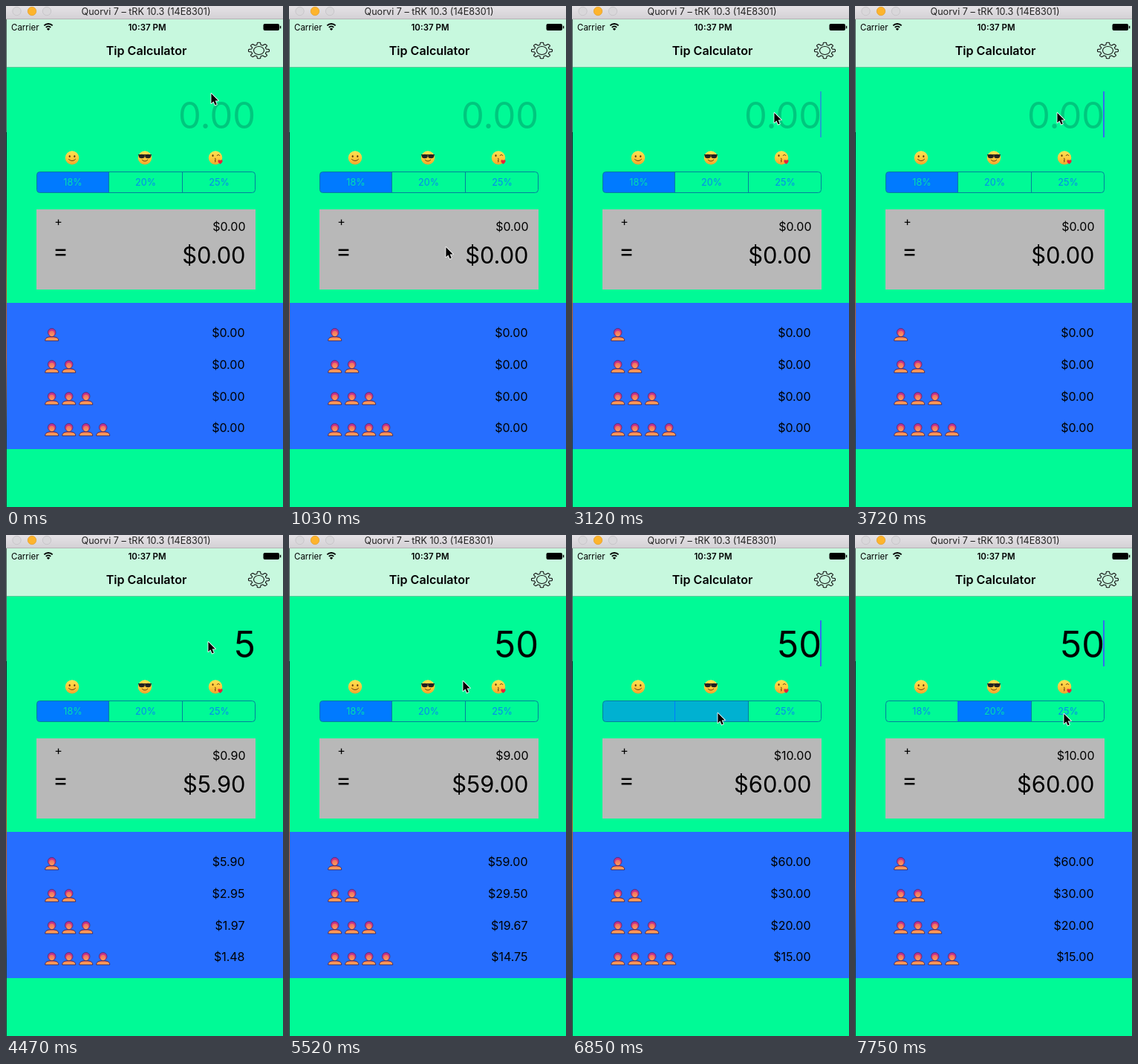
An HTML page with a canvas that plays this animation: 373 px wide and 675 px high, repeating every 8000 ms.

```html
<!DOCTYPE html>
<html lang="en">
<head>
<meta charset="utf-8">
<title>Tip Calculator</title>
<style>
html, body { margin: 0; width: 100%; height: 100%; overflow: hidden; background: #00fa96; }
canvas { display: block; width: 373px; height: 675px; }
</style>
</head>
<body>
<canvas id="stage"></canvas>
<script>
const W = 373, H = 675, LOOP = 8000, STEP = 148.9;
const GREEN = '#00fa96', BLUE = '#007aff', LINE = '#04809c', FONT = 'Inter, "Liberation Sans", sans-serif';
const canvas = document.getElementById('stage');
const ctx = canvas.getContext('2d');
const dpr = window.devicePixelRatio || 1;
canvas.width = W * dpr;
canvas.height = H * dpr;

// Keys are [tick, value...]; the screen updates once per tick.
const pointerKeys = [
  [0, 276, 117], [7, 211, 324], [8, 188, 291], [10, 181, 250], [15, 272, 143], [35, 272, 143],
  [39, 196, 249], [40, 196, 249], [43, 196, 239], [47, 196, 239], [52, 281, 240]
];
const caretKeys = [
  [0, 0], [17, 1], [21, .6], [22, 0], [24, .6], [25, 1], [29, .6], [30, 0], [31, 1], [35, .6], [36, 0],
  [38, .6], [39, 1], [41, .6], [42, 0], [45, .6], [46, 1], [48, .6], [49, 0], [51, .6], [52, 1]
];
const billKeys = [[0, ''], [26, '5'], [31, '50']];

function held(keys, tick) {
  return keys.filter(k => k[0] <= tick).pop()[1];
}

function pointerAt(tick) {
  const next = pointerKeys.findIndex(k => k[0] > tick);
  if (next < 0) return pointerKeys[pointerKeys.length - 1].slice(1);
  const a = pointerKeys[next - 1], b = pointerKeys[next];
  const u = (tick - a[0]) / (b[0] - a[0]), e = u * u * (3 - 2 * u);
  return [a[1] + (b[1] - a[1]) * e, a[2] + (b[2] - a[2]) * e];
}

function rect(x, y, w, h, fill) {
  ctx.fillStyle = fill;
  ctx.fillRect(x, y, w, h);
}

function text(str, x, y, size, align = 'left', color = '#000', weight = 400) {
  ctx.font = `${weight} ${size}px ${FONT}`;
  ctx.textAlign = align;
  ctx.fillStyle = color;
  ctx.fillText(str, x, y);
}

function paint(fill, stroke, width = 1) {
  if (fill) { ctx.fillStyle = fill; ctx.fill(); }
  if (stroke) { ctx.strokeStyle = stroke; ctx.lineWidth = width; ctx.stroke(); }
}

function oval(x, y, rx, ry, fill, stroke, width = 1) {
  ctx.beginPath();
  ctx.ellipse(x, y, rx, ry, 0, 0, Math.PI * 2);
  paint(fill, stroke, width);
}

function arc(x, y, r, from, to, color, width) {
  ctx.beginPath();
  ctx.arc(x, y, r, from * Math.PI, to * Math.PI);
  paint(null, color, width);
}

function vertical(y0, y1, ...colors) {
  const g = ctx.createLinearGradient(0, y0, 0, y1);
  colors.forEach((c, i) => g.addColorStop(i / (colors.length - 1), c));
  return g;
}

function windowBar() {
  rect(0, 0, W, 17, vertical(0, 17, '#e5e2e6', '#d4d1d5'));
  rect(0, 17, W, 1, '#b5b3b6');
  oval(14.5, 7, 5.7, 5.7, '#d9d7da', '#c3c1c4', .8);
  oval(35, 7, 5.7, 5.7, '#fdb42c', '#e5a02c', .8);
  oval(55, 7, 5.7, 5.7, '#d9d7da', '#c3c1c4', .8);
  text('Quorvi 7 – tRK 10.3 (14E8301)', 188.5, 12, 12.6, 'center', '#222');
}

function gear(x, y) {
  ctx.beginPath();
  for (let i = 0; i <= 160; i++) {
    const a = i / 160 * Math.PI * 2;
    const r = .86 + .14 * Math.tanh(3 * Math.cos(8 * a));
    ctx.lineTo(x + 14 * r * Math.cos(a), y + 10.8 * r * Math.sin(a));
  }
  ctx.closePath();
  paint(null, '#111', 1.1);
  oval(x, y, 7, 5.5, null, '#111', 1.1);
}

function navBar() {
  rect(0, 18, W, 64, '#c7f8de');
  rect(0, 82, W, 1, '#62c99c');
  text('Carrier', 7, 32.5, 11.5);
  for (const r of [4.5, 8]) arc(57, 32, r, 1.25, 1.75, '#000', 1.9);
  ctx.beginPath();
  ctx.moveTo(57, 33);
  ctx.arc(57, 33, 3, 1.25 * Math.PI, 1.75 * Math.PI);
  paint('#000');
  text('10:37 PM', 190, 32.5, 11.5, 'center', '#000', 600);
  ctx.beginPath();
  ctx.roundRect(346.5, 24, 21.5, 9, 2);
  paint('#000');
  rect(368.8, 26.8, 1.5, 3.5, '#000');
  text('Tip Calculator', 189, 66, 16.1, 'center', '#000', 600);
  gear(340.5, 60);
}

function face(x) {
  oval(x, 204.5, 9.2, 9.2, vertical(195, 214, '#ffe255', '#ffca3e', '#f1a32c'));
}

function emojis() {
  const brown = '#663d10';
  face(89);
  oval(85.7, 202.5, 1.1, 1.6, brown);
  oval(92.3, 202.5, 1.1, 1.6, brown);
  arc(89, 202.5, 6, .2, .8, brown, 1);

  face(187);
  rect(178, 200, 18, 1.4, '#222');
  oval(182.8, 202.5, 4, 2.8, '#222');
  oval(191.2, 202.5, 4, 2.8, '#222');
  arc(187, 204, 5, .2, .8, brown, 1);

  face(282);
  oval(278.5, 201.5, 1.1, 1.6, brown);
  arc(286, 202.5, 2, 1.1, 1.9, brown, 1);
  arc(281, 206.5, 1.3, 1.5, 2.5, brown, 1);
  arc(281, 209, 1.2, 1.5, 2.5, brown, 1);
  ctx.beginPath();
  ctx.moveTo(288.5, 213);
  ctx.bezierCurveTo(283, 209, 286, 205.5, 288.5, 208);
  ctx.bezierCurveTo(291, 205.5, 294, 209, 288.5, 213);
  paint('#e5243b');
}

function segments(tick) {
  const edges = [41, 138.5, 237.5, 336];
  const fills = tick < 45 ? [1, 0, 0] : tick < 46 ? [1, .2, 0] : tick < 47 ? [.56, .56, 0] : [0, 1, 0];
  ctx.save();
  ctx.beginPath();
  ctx.roundRect(41.5, 223.5, 294, 28, 4);
  ctx.clip();
  fills.forEach((alpha, i) => {
    ctx.globalAlpha = alpha;
    rect(edges[i], 223, edges[i + 1] - edges[i], 29, BLUE);
  });
  ctx.restore();
  ctx.beginPath();
  ctx.roundRect(41.5, 223.5, 294, 28, 4);
  paint(null, LINE, 1);
  rect(138, 224, 1, 27, tick >= 45 ? BLUE : LINE);
  rect(237, 224, 1, 27, LINE);
  ['18%', '20%', '25%'].forEach((label, i) => {
    if (fills[i] === .56) return;
    text(label, [90, 188, 287][i], 242, 12.6, 'center', fills[i] === 1 ? '#00e0ad' : '#0588f0');
  });
}

function person(x, y) {
  const edge = '#4a2148';
  ctx.beginPath();
  ctx.moveTo(x - 9, y + 17.5);
  ctx.bezierCurveTo(x - 9, y + 13, x - 5, y + 12.6, x - 2, y + 12.2);
  ctx.lineTo(x + 2, y + 12.2);
  ctx.bezierCurveTo(x + 5, y + 12.6, x + 9, y + 13, x + 9, y + 17.5);
  ctx.closePath();
  paint(vertical(y + 12, y + 18, '#e8605c', '#ff9a58', '#ffb45c'), edge, .9);
  oval(x, y + 6.3, 5.3, 5.4, vertical(y + 1, y + 12, '#b02a98', '#d83c7c', '#e8506c'), edge, .6);
  oval(x, y + 7.8, 3.3, 3.8, vertical(y + 4, y + 12, '#ee6a62', '#ffa25c'));
}

function money(value) {
  return '$' + value.toFixed(2);
}

function amounts(bill, rate) {
  const tip = bill * rate, total = bill + tip;
  rect(41, 274, 295, 108, '#b8b8b8');
  text('+', 70.5, 296, 16, 'center');
  text('=', 73.5, 340.5, 31, 'center');
  text(money(tip), 322.5, 303, 16, 'right');
  text(money(total), 322.5, 347, 30.8, 'right');

  rect(0, 400, W, 197, '#266eff');
  [446, 489, 532, 574].forEach((y, row) => {
    text(money(total / (row + 1)), 321.5, y, 16, 'right');
    for (let i = 0; i <= row; i++) person(61.7 + 23 * i, y - 12.5);
  });
}

function desktopEdge() {
  rect(0, 18, 1, 152, '#52645f');
  rect(0, 170, 1, 505, vertical(170, 675, '#18232a', '#26323a', '#a8562a', '#c0602a', '#2b3a34', '#24443a'));
}

function pointer(x, y) {
  const outline = [[0, 0], [0, 13.2], [3, 10.4], [5.2, 15.6], [7.4, 14.6], [5.3, 9.6], [9.4, 9.4]];
  ctx.beginPath();
  outline.forEach(([dx, dy]) => ctx.lineTo(x + .4 + dx, y + 1 + dy));
  ctx.closePath();
  ctx.lineJoin = 'round';
  paint(null, '#fff', 1.7);
  paint('#000');
}

function draw(tick) {
  ctx.setTransform(dpr, 0, 0, dpr, 0, 0);
  rect(0, 0, W, H, GREEN);
  windowBar();
  navBar();
  const bill = held(billKeys, tick);
  text(bill || '0.00', 336, 164.5, 48.8, 'right', bill ? '#000' : '#00c77e');
  ctx.globalAlpha = held(caretKeys, tick);
  rect(334, 115, 2, 62, '#356df0');
  ctx.globalAlpha = 1;
  emojis();
  segments(tick);
  amounts(Number(bill), tick < 46 ? .18 : .2);
  desktopEdge();
  pointer(...pointerAt(tick));
}

function frame() {
  draw(Math.floor((performance.now() % LOOP + 15) / STEP));
  requestAnimationFrame(frame);
}
frame();
</script>
</body>
</html>
```
